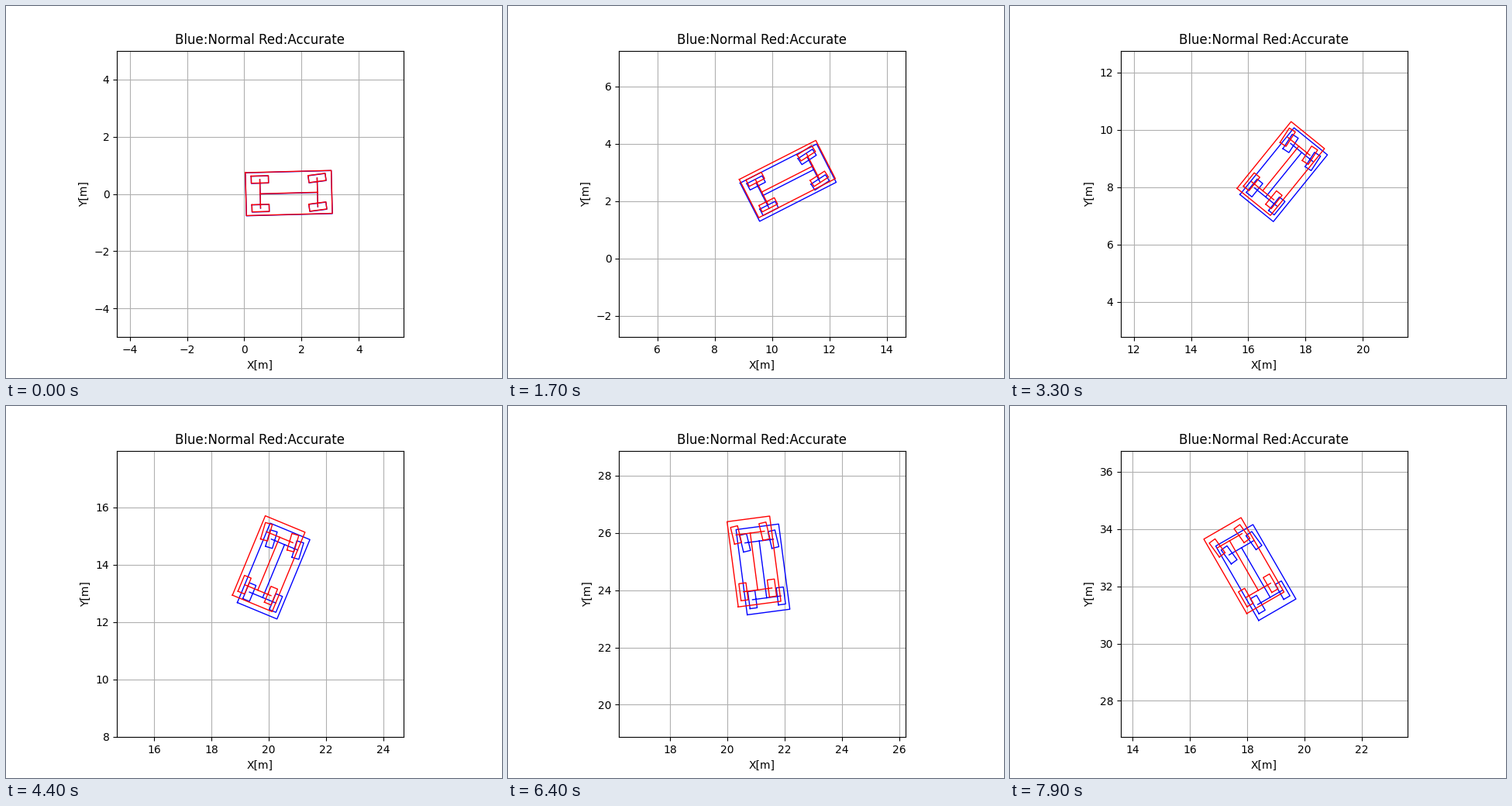
A matplotlib script for the animation above (8 s loop, 640x480 px).

```python
import numpy as np
import matplotlib.pyplot as plt
from matplotlib.animation import FuncAnimation

DT = 0.1
SPEED = 5.56                 # m/s
YAW_RATE = np.radians(15)    # rad/s
STEER = np.radians(6)
WHEEL_BASE = 2.0
HALF_TRACK = 0.5
STEPS = 80
VIEW = 5.0


def rotate(pts, angle):
    c, s = np.cos(angle), np.sin(angle)
    return np.asarray(pts) @ np.array([[c, s], [-s, c]])


def box(x0, x1, half_w):
    return np.array([(x0, half_w), (x1, half_w), (x1, -half_w),
                     (x0, -half_w), (x0, half_w)])


def car_parts():
    """Polylines of the car, with the rear axle centre at the origin."""
    parts = [box(-0.5, WHEEL_BASE + 0.5, 0.75),
             np.array([(0, 0), (WHEEL_BASE, 0)])]
    wheel = box(-0.3, 0.3, 0.125)
    for x, angle in ((0, 0), (WHEEL_BASE, STEER)):
        parts.append(np.array([(x, HALF_TRACK), (x, -HALF_TRACK)]))
        for y in (HALF_TRACK, -HALF_TRACK):
            parts.append(rotate(wheel, angle) + (x, y))
    return parts


def join(parts):
    gap = np.full((1, 2), np.nan)
    return np.vstack([p for part in parts for p in (part, gap)])


CAR = join(car_parts())


def euler_pos(n):
    heading = YAW_RATE * DT * np.arange(n)
    step = SPEED * DT
    return step * np.array([np.cos(heading).sum(), np.sin(heading).sum()])


def arc_pos(n):
    heading = YAW_RATE * DT * n
    radius = SPEED / YAW_RATE
    return radius * np.array([np.sin(heading), 1 - np.cos(heading)])


fig, ax = plt.subplots(figsize=(6.4, 4.8), dpi=100)
ax.set_aspect("equal", adjustable="box")
ax.set_title("Blue:Normal Red:Accurate")
ax.set_xlabel("X[m]")
ax.set_ylabel("Y[m]")
ax.grid(True)

models = [(euler_pos, ax.plot([], [], color="blue", lw=1)[0]),
          (arc_pos, ax.plot([], [], color="red", lw=1)[0])]


def update(i):
    n = i + 1
    body = rotate(CAR, YAW_RATE * DT * n)
    spots = []
    for locate, line in models:
        pos = locate(n)
        line.set_data(*(body + pos).T)
        spots.append(pos)
    cx, cy = np.mean(spots, axis=0)
    ax.set_xlim(cx - VIEW, cx + VIEW)
    ax.set_ylim(cy - VIEW, cy + VIEW)
    return [line for _, line in models]


anim = FuncAnimation(fig, update, frames=STEPS, interval=100,
                     repeat=True, repeat_delay=0, blit=False)
plt.show()
```
